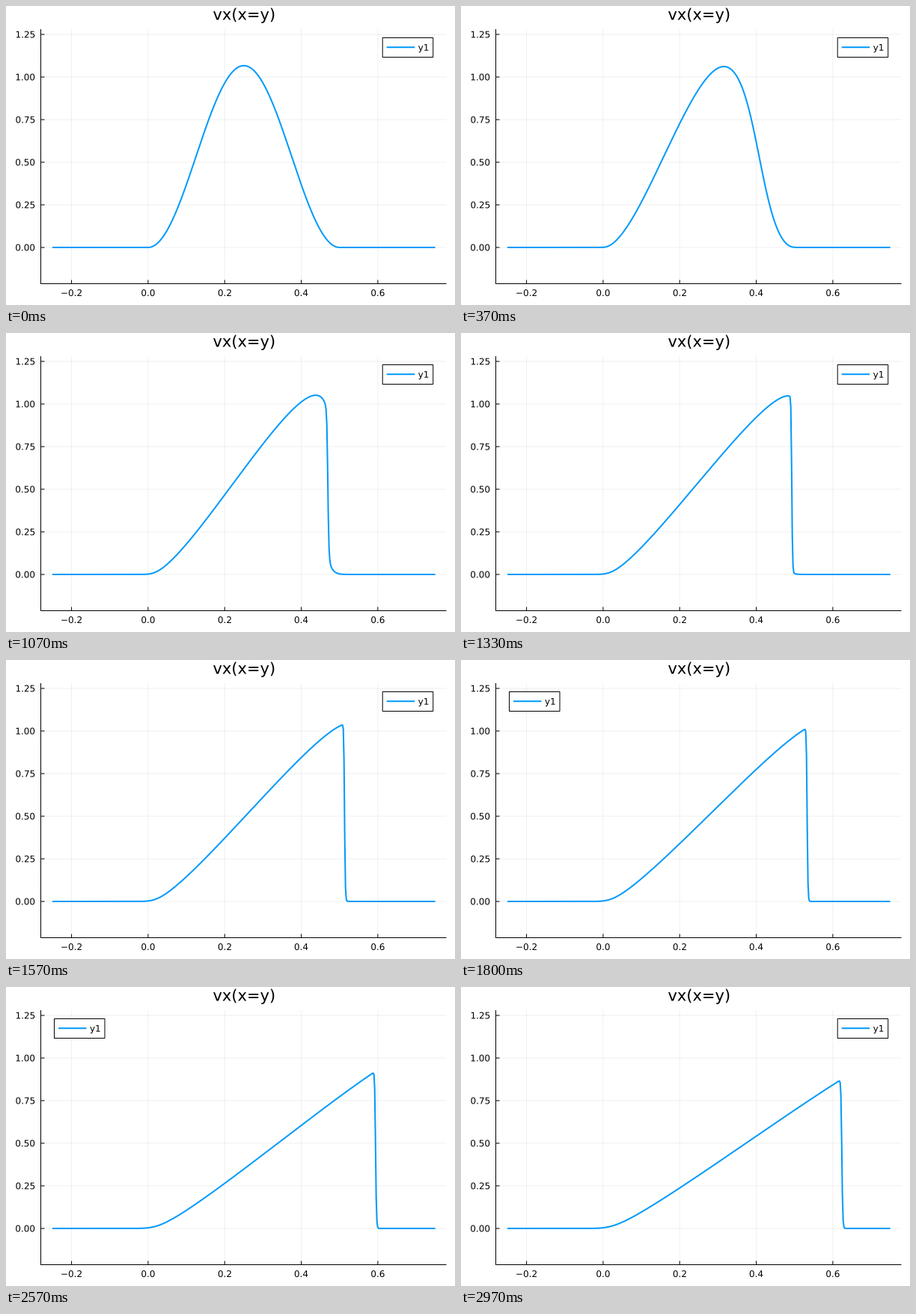
A matplotlib script for the animation above (3010 ms loop, 600 by 400 pixels).

```python
import numpy as np
import matplotlib.pyplot as plt
from matplotlib.animation import FuncAnimation
from matplotlib.patches import PathPatch, Rectangle
from matplotlib.textpath import TextPath
from matplotlib.transforms import Affine2D

W, H, DPI = 600, 400, 100
PT = 72 / DPI                      # points per pixel
BLUE = "#009afa"
plt.rcParams["font.family"] = "DejaVu Sans"

# 2D Burgers flow with vx = vy, in coordinates along (p) and across (q) x = y
AMP, MU = 16 / 15, 0.0005
STATES, T_END, SUBSTEPS = 90, 0.5, 8
p = np.linspace(-0.25, 0.75, 1025)
q = np.arange(0, 0.3, 0.005)
dp, dq = p[1] - p[0], q[1] - q[0]


def bump(x):
    return np.where((x > 0) & (x < 0.5), np.sin(2 * np.pi * x), 0)


def rate(u):
    f = u * u / 2
    wide = np.vstack([u[1], u, np.zeros_like(p)])    # mirrored at q = 0
    du = MU * (wide[2:] - 2 * u + wide[:-2]) / dq**2
    du[:, 1:-1] += MU * (u[:, 2:] - 2 * u[:, 1:-1] + u[:, :-2]) / dp**2
    du[:, 1:-1] -= (f[:, 2:] - f[:, :-2]) / (2 * dp)
    du[:, [0, -1]] = 0
    return du


def solve():
    u = AMP * bump(p + q[:, None]) * bump(p - q[:, None])
    dt = T_END / (STATES - 1) / SUBSTEPS
    profiles = [u[0].copy()]
    for _ in range(STATES - 1):
        for _ in range(SUBSTEPS):
            k1 = rate(u)
            k2 = rate(u + dt * k1)
            u = u + dt * (k1 + k2) / 2
        profiles.append(u[0].copy())
    return np.array(profiles)[:, ::2]


def px(x):
    return 189.9 + 511.6 * x


def py(y):
    return 323 - 228 * y


profiles = solve()

fig = plt.figure(figsize=(W / DPI, H / DPI), dpi=DPI, facecolor="white")
ax = fig.add_axes([0, 0, 1, 1])
ax.set(xlim=(0, W), ylim=(H, 0))
ax.axis("off")


def line(xs, ys, width=1, color="black", **kw):
    return ax.plot(xs, ys, color=color, lw=width * PT, snap=False,
                   solid_capstyle="butt", **kw)[0]


def label(x, y, s, size=12, align=0.5, zorder=2):
    """Text as outlines; align 0, 0.5, 1 puts its left, middle, right at x."""
    glyphs = TextPath((0, 0), s, size=size)
    ink = glyphs.get_extents()
    shift = x - ink.x0 - align * ink.width
    path = Affine2D().scale(1, -1).translate(shift, y).transform_path(glyphs)
    return ax.add_patch(PathPatch(path, fc="black", lw=0, snap=False,
                                  zorder=zorder))


def legend(x):
    box = Rectangle((x, 42.5), 67.5, 26, fc="white", ec="black", lw=PT,
                    snap=False, zorder=4)
    return [ax.add_patch(box),
            line([x + 5.5, x + 43], [55.2, 55.2], 2, BLUE, zorder=5),
            label(x + 47.8, 59.7, "y1", align=0, zorder=5)]


left, right, top, bottom = 46.5, 588.5, 31, 371.5

for x in (-0.2, 0, 0.2, 0.4, 0.6):
    line([px(x)] * 2, [top, bottom], alpha=0.06, zorder=0)
    line([px(x)] * 2, [bottom - 5, bottom])
    label(px(x), 388, f"{x:.1f}".replace("-", "\u2212"))
for y in (0, 0.25, 0.5, 0.75, 1, 1.25):
    line([left, right], [py(y)] * 2, alpha=0.06, zorder=0)
    line([left, left + 5], [py(y)] * 2)
    label(38.2, py(y) + 4.4, f"{y:.2f}", align=1)
line([left, left], [top, bottom + 0.5])
line([left, right], [bottom, bottom])
label(317.7, 18.5, "vx(x=y)", 21)

curve = line(px(p[::2]), py(profiles[0]), 2, BLUE, zorder=3)
left_key, right_key = legend(64.5), legend(503.2)


def update(tick):
    k = min(int((tick + 0.5) * 0.3), STATES - 1)     # 30 states per second
    curve.set_ydata(py(profiles[k]))
    on_left = 48 <= k < 79
    for a, b in zip(left_key, right_key):
        a.set_visible(on_left)
        b.set_visible(not on_left)
    return [curve, *left_key, *right_key]


anim = FuncAnimation(fig, update, frames=301, interval=10, repeat=True,
                     repeat_delay=0, init_func=lambda: update(0))
plt.show()
```
